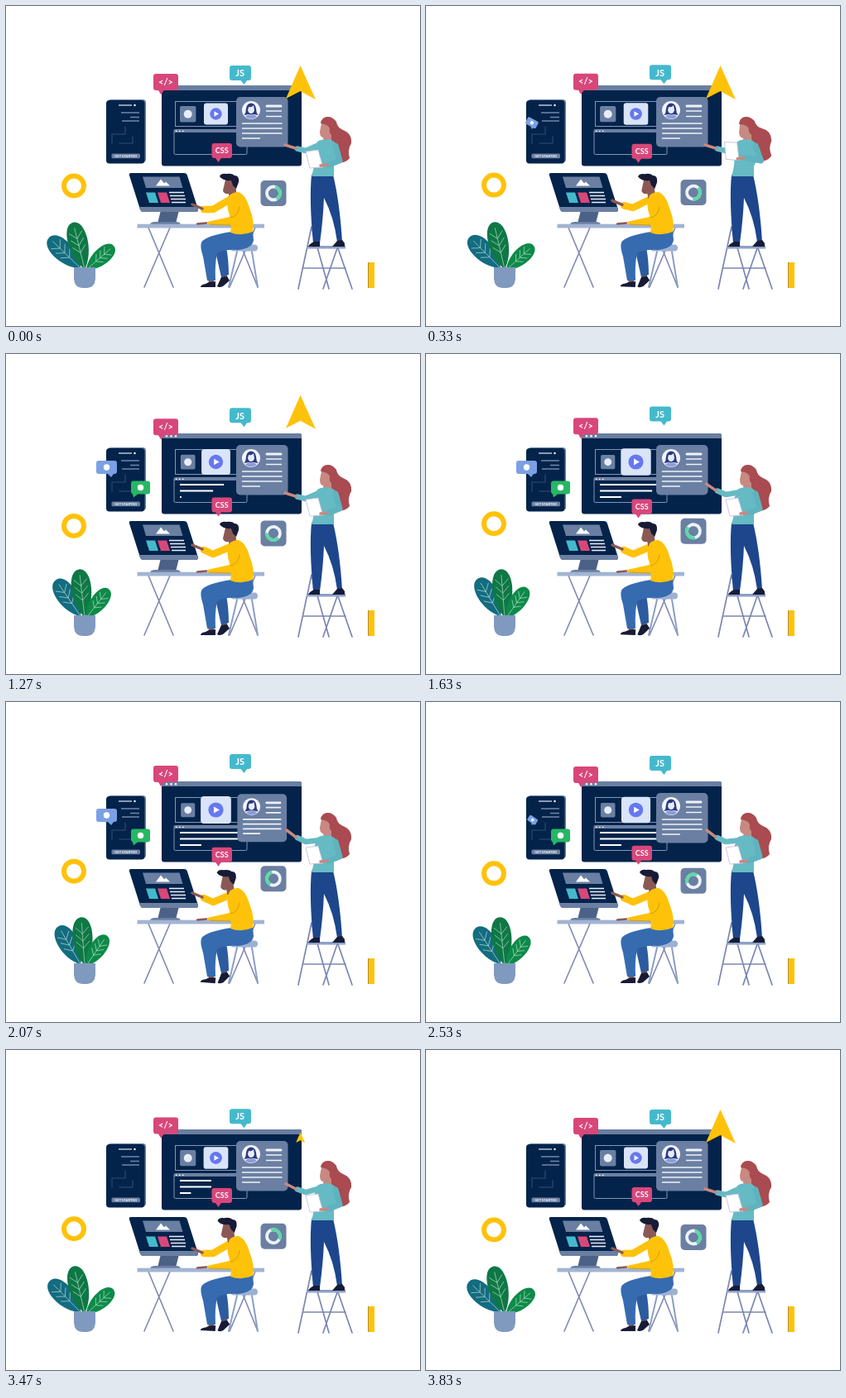
An HTML page for the animation above (3.86 s loop, 500 by 387 pixels).

```html
<!DOCTYPE html>
<html lang="en">
<head>
<meta charset="utf-8">
<title>Team building an app</title>
<style>
  html, body { margin: 0; width: 100%; height: 100%; overflow: hidden; background: #fff; }
  svg { display: block; width: 100vw; height: 100vh; }
  text { font-family: Lato, "Open Sans", sans-serif; font-weight: 700; fill: #fff; text-anchor: middle; }
  .line { fill: none; stroke-linecap: round; stroke-linejoin: round; }
  .pale { fill: none; stroke: #eef2f9; stroke-width: 1.7; }
  .bold { stroke-width: 3; stroke-linecap: round; }
</style>
</head>
<body>
<svg viewBox="0 0 500 387">
  <rect width="500" height="387" fill="#fff"/>

  <!-- browser window -->
  <rect x="188" y="96" width="169" height="97.5" rx="3" fill="#04234a"/>
  <path d="M188 102v-3q0-3 3-3h163q3 0 3 3v3z" fill="#6a7fa2"/>
  <g fill="#fff"><circle cx="194" cy="99.2" r="1.3"/><circle cx="199.5" cy="99.2" r="1.3"/><circle cx="205" cy="99.2" r="1.3"/></g>
  <rect x="204.500" y="115.500" width="87" height="30" fill="none" stroke="#8296b6"/>
  <g id="shot">
    <rect x="-9.700" y="-9.700" width="19.400" height="19.400" rx="2" fill="#6a7fa2"/>
    <circle r="5" fill="#e8eef8"/>
  </g>
  <g id="play">
    <rect x="-14.500" y="-13" width="29" height="26" rx="3" fill="#d9e4f8"/>
    <circle r="7.200" fill="#6678ef"/>
    <path d="M-2-3.200L3.500 0-2 3.200z" fill="#fff"/>
  </g>
  <rect x="203" y="149.500" width="88" height="30" rx="1.500" fill="none" stroke="#8296b6"/>
  <path d="M203 151.300h88" stroke="#6a7fa2" stroke-width="3.600"/>
  <path d="M205 151.400h1.500m2.500 0h1.500m2.500 0h1.500" stroke="#fff" stroke-width="1.200"/>
  <path id="code" stroke="#fff" stroke-width="2"/>
  <g id="card">
    <rect x="278" y="110" width="62.500" height="60.500" rx="5" fill="#6a7fa2"/>
    <circle cx="296" cy="126" r="11" fill="#f1f4fa"/>
    <path d="M287.500 132Q290 129 290 124 291 117.500 296 117.500T302 124Q302 129 304.500 132L299 131h-6z" fill="#2c3b80"/>
    <path d="M289 134q2-3 7-3t7 3q-7 5-14 0z" fill="#8d9cd6"/>
    <path d="M293 122q4 1 6-2l1 6q-1 4-4 4t-4-4z" fill="#e8eef8"/>
    <path class="pale bold" d="M315 121h17"/>
    <path class="pale" d="M314 127h19M314 133.500h19M285 142h48.500M285 148h48.500M285 154h48.500M285 160h22"/>
  </g>

  <!-- phone -->
  <rect x="123" y="113" width="46" height="76" rx="4" fill="#6a7fa2"/>
  <rect x="121" y="114" width="46.500" height="76.500" rx="4" fill="#04234a"/>
  <path d="M136 120h16" stroke="#b7c5dd" stroke-width="1.500"/><circle cx="155.500" cy="120" r="1.200" fill="#fff"/>
  <path d="M139 129h22M150 134.500h11M140 139h21" stroke="#7186aa" stroke-width="1.300"/>
  <path class="line" d="M128 166v-11h16v-9M137 166h16v-8" stroke="#233f69" stroke-width="1.600"/>
  <rect x="127.500" y="178.500" width="34.500" height="5.700" rx="1.500" fill="#6a7fa2"/>
  <text x="144.700" y="182.900" font-size="4.200">GET STARTED</text>
  <g id="blue">
    <path d="M-16-20H3q3 0 3 3v10q0 3-3 3H2L-1 0l-4-4h-11q-3 0-3-3v-10q0-3 3-3z" fill="#7ba0e4"/>
    <circle cx="-6.500" cy="-12" r="3.700" fill="#fff"/>
  </g>
  <g id="green">
    <path d="M0-20h17q3 0 3 3v10q0 3-3 3H5L0 0l-1-4q-2-1-2-3v-10q0-3 3-3z" fill="#27b764"/>
    <circle cx="8.500" cy="-12" r="3.700" fill="#fff"/>
  </g>

  <!-- speech labels -->
  <g id="tag">
    <path d="M181 82h24q3 0 3 3v14q0 3-3 3h-14l-4 5-3-5h-3q-3 0-3-3v-14q0-3 3-3z" fill="#d8477a"/>
    <text x="193" y="95.700" font-size="11">&lt;/&gt;</text>
  </g>
  <g id="js">
    <path d="M273 72h20q3 0 3 3v12q0 3-3 3h-2l-3.500 5-4-5H273q-3 0-3-3V75q0-3 3-3z" fill="#45b9cc"/>
    <text x="282.700" y="85.200" font-size="11">JS</text>
  </g>
  <g id="css">
    <path d="M251.500 167H270q3 0 3 3v12q0 3-3 3h-10l-3.500 5-3.500-5h-1.500q-3 0-3-3v-12q0-3 3-3z" fill="#d8477a"/>
    <text x="260.700" y="179.300" font-size="9">CSS</text>
  </g>

  <path id="arrow" d="M0 0L18.500 41 0 31-17.500 40z" fill="#ffc20a"/>
  <circle id="ring" cx="82" r="12" fill="none" stroke="#ffc20a" stroke-width="6"/>
  <path d="M437 310h8v31h-8z" fill="#ffc20a"/><path d="M437.500 310v31" stroke="#b18c3c"/>

  <!-- donut widget -->
  <g id="widget">
    <rect x="-15.500" y="-15.500" width="31" height="31" rx="5" fill="#6a7fa2"/>
    <g id="donut" fill="none" stroke-width="3.800">
      <circle r="8" stroke="#edf2fa"/>
      <path d="M2-7.750A8 8 0 0 1 3.400 7.240" stroke="#5bd9a4"/>
    </g>
  </g>

  <!-- plant -->
  <g id="plant"></g>
  <path d="M82 316h26v14q-1 11-10 11h-6q-9 0-10-11z" fill="#8099bf"/>

  <!-- desk, monitor, stool -->
  <path class="line" d="M172 268l30 72M198 268l-31 72M275 268l29 72M301 268l-31 72" stroke="#8187b5" stroke-width="1.600"/>
  <path d="M187 247h22l-4 16h-22z" fill="#4c6186"/>
  <path d="M174 264q1-3 6-3h25q5 0 6 3z" fill="#6a7fa2"/>
  <path d="M151 202h64q3 0 4 3l13 41q0 3-3 3h-63q-3 0-4-3l-13-41q-1-3 2-3z" fill="#04234a"/>
  <path d="M160.500 243h70.500l1 3q0 3-3 3h-63q-3 0-4-3z" fill="#6a7fa2"/>
  <path d="M165 206.500h44.500l4 13.500h-44.500z" fill="#6a7fa2"/>
  <path d="M181 217.500l6-8 4 5 2-2 5 5z" fill="#fff"/>
  <path d="M169 225.500h11l4 12.500h-11z" fill="#45b9cc"/><path d="M183 225.500h11l4 12.500h-11z" fill="#d8477a"/>
  <path class="pale" d="M197 225.500h18M198 229.500h18M199 233.500h18M200 237.500h17"/>
  <rect x="158.500" y="263.700" width="153.500" height="4.800" fill="#a2b4d3"/>
  <path class="line" d="M279 297l-10 43M297 297l7 43" stroke="#8ba0c4" stroke-width="2"/>
  <rect x="271" y="288.500" width="33" height="8" rx="4" fill="#9db0d2"/>

  <!-- man -->
  <g id="manArm" class="line"><path stroke="#ffc20a" stroke-width="8.500"/><path stroke="#8b5955" stroke-width="3.500"/></g>
  <path d="M244 329h7v7h-6zM260 325h7v6h-6z" fill="#8b5955"/>
  <path id="backShoe" d="M260 328l7-1 3 5-8 7q-5 2-7 0z" fill="#171b36"/>
  <path id="frontShoe" d="M245 334l8-1v7h-18q0-3 6-4z" fill="#171b36"/>
  <path d="M266 282Q252 285 253 297L260 328 269 325Q269 307 266 292z" fill="#2c5b9f"/>
  <path d="M272 273Q240 278 236 286 234 291 238 303L243 332H253Q252 312 255 299 264 294 280 295 298 293 299 283L298 272z" fill="#366bb0"/>
  <g id="manHead">
    <path d="M265 210h12l1 14 1 8-9 1-1-6q-6 1-7-4z" fill="#8b5955"/>
    <path d="M258 206q2-4 8-3 7-1 10 2 6 0 5 8l-3 8-4-4-2-6q-10 1-14-5z" fill="#171b36"/>
  </g>
  <path d="M270 229Q274 225 281 225 290 229 294 244 301 262 298 273 284 279 271 274 273 263 270 253 265 240 270 229z" fill="#ffc20a"/>
  <path d="M279 240Q290 245 287 256 284 265 274 265L244 264 243 261 270 255z" fill="#ffc20a"/>
  <path class="line" d="M271 256q9-1 11-13M271 265l-25-1" stroke="#d99d00"/>
  <path class="line" d="M242 262.500l-11 1" stroke="#8b5955" stroke-width="2.500"/>

  <!-- ladder -->
  <path class="line" d="M369 267l-16 75M369 267l21 75M401 293l17 49M400 293l-17 49M359 317h51" stroke="#7c86b2" stroke-width="1.700"/>
  <rect x="363" y="290" width="47" height="3.500" fill="#8ca0c5"/>

  <!-- woman -->
  <path d="M369 204h26Q403 237 406 285h-6Q396 255 384 232 383 258 379 287h-8Q366 235 369 204z" fill="#1d468c"/>
  <path d="M372 285h7v6h-14q1-3 7-6zM400 284l6-1 3 4v4h-15z" fill="#171b36"/>
  <g id="womanHead">
    <path d="M385 135Q393 132 399 140 400 147 407 150 418 154 417 166 412 174 415 184 410 190 404 189 401 178 396 172 392 164 393 154z" fill="#a94b50"/>
    <path d="M381 142q6-5 11 0l1 13v10l-9 1-1-7q-4 0-4-7z" fill="#c78981"/>
    <path d="M380 142Q381 134 389 134q9 1 10 11l-6 11q-3-3-2-8-2-5-11-6z" fill="#a94b50"/>
  </g>
  <path d="M376 164Q382 160 393 162 403 167 402 180L396 194v12h-27Q374 190 372 176z" fill="#66bac3"/>
  <g id="pointer" class="line"><path stroke="#66bac3" stroke-width="6.500"/><path stroke="#c78981" stroke-width="3.500"/></g>
  <path id="paper" d="M362 176l15-2 6 21-16 1z" fill="#fff" stroke="#bcb9df" stroke-width=".8"/>
  <g id="holder" class="line"><path stroke="#5fb3be" stroke-width="7"/><path stroke="#c78981" stroke-width="3.500"/></g>
</svg>

<script>
const LOOP = 3860;
const $ = id => document.getElementById(id);
const set = (id, transform) => $(id).setAttribute('transform', transform);
const mix = (a, b, k) => a + (b - a) * k;
const linear = (t, a, b) => Math.min(1, Math.max(0, (t - a) / (b - a)));
const ramp = (t, a, b) => { const k = linear(t, a, b); return k * k * (3 - 2 * k); };
const pulse = (t, a, b, c, d) => ramp(t, a, b) - ramp(t, c, d);

// base x, base y, length, half width, open angle, closed angle, colour
const leaves = [
  [90, 317, 53, 16, -46, -30, '#136c80'],
  [95, 318, 58, 16, -14, -4, '#0e7845'],
  [97, 319, 44, 13, 49, 34, '#0d8a48']
];

function leafShape([, , len, w, , , fill]) {
  let veins = `M0 0V${-len * .88}`;
  for (const k of [.35, .5, .65]) {
    veins += `M${-w * .5} ${-len * (k + .14)}L0 ${-len * k}L${w * .5} ${-len * (k + .14)}`;
  }
  return `<g><path d="M0 0C${-w} ${-len * .3} ${-w} ${-len} 0 ${-len}C${w} ${-len} ${w} ${-len * .3} 0 0z" fill="${fill}"/>
    <path d="${veins}" fill="none" stroke="#c5e6d8" stroke-width=".6"/></g>`;
}
$('plant').innerHTML = leaves.map(leafShape).join('');

function limb(id, sleeve, hand) {
  const [cloth, skin] = $(id).children;
  cloth.setAttribute('d', sleeve);
  skin.setAttribute('d', hand);
}

function pop(id, x, y, size) {
  set(id, `translate(${x} ${y}) rotate(${(1 - size) * 65}) scale(${size})`);
}

function draw(t) {
  const phase = t / LOOP * 2 * Math.PI;
  const sway = (1 - Math.cos(phase)) / 2;
  const nod = (1 - Math.cos(phase * 3)) / 2;

  set('js', `translate(0 ${-9 * sway})`);
  set('tag', `translate(0 ${-5 * sway})`);
  set('css', `translate(0 ${-1 + 10 * sway})`);
  $('ring').setAttribute('cy', 217.5 - 13 * sway);
  set('shot', `translate(219.700 130.700) scale(${1 - .12 * sway})`);
  set('play', `translate(253.500 130.500) scale(${1 + .27 * sway})`);
  set('widget', `translate(323 ${226.5 - 13 * sway})`);
  set('donut', `rotate(${t / LOOP * 360})`);
  leaves.forEach(([x, y, , , open, closed], i) =>
    $('plant').children[i].setAttribute('transform', `translate(${x} ${y}) rotate(${mix(open, closed, sway)})`));

  pop('blue', 128, 149, pulse(t, 150, 480, 2380, 2670));
  pop('green', 154, 173.5, pulse(t, 560, 860, 2970, 3230));

  const erase = 1 - ramp(t, 3250, 3700);
  const rows = [[158, 74, 560, 1550], [165.5, 74, 645, 1800], [173, 26, 1245, 1620]];
  $('code').setAttribute('d', rows.map(([y, w, a, b]) => `M210 ${y}h${w * linear(t, a, b) * erase}`).join(''));

  const shrink = 1 - .045 * pulse(t, 1750, 2050, 2100, 2450);
  set('card', `translate(309.500 140.500) scale(${shrink}) translate(-309.500 -140.500)`);

  const lift = 55 * linear(t, 1080, 1480) ** 1.23;
  const back = t > 2000;
  const size = back ? ramp(t, 3350, 3680) : 1;
  set('arrow', back ? `translate(355.500 ${112 - 40 * size}) scale(${size})` : `translate(355.500 ${72 - lift})`);
  $('arrow').setAttribute('opacity', back ? 1 : 1 - linear(t, 1390, 1500));

  const reach = pulse(t, 150, 500, 2750, 3200);
  const handY = mix(240, 231, reach);
  const elbowY = mix(246, 242, reach);
  limb('manArm', `M274 232L250 ${elbowY}L239 ${handY + 6}`, `M237 ${handY + 5}L225 ${handY}`);
  set('manHead', `translate(${-3 * nod} 0) rotate(${-2 * nod} 274 230)`);
  set('frontShoe', `rotate(${5 * nod} 251 336)`);
  set('backShoe', `rotate(${-4 * nod} 263 328)`);

  const look = pulse(t, 80, 450, 900, 1260);
  set('womanHead', `rotate(${-8 * look} 388 161)`);
  set('paper', `translate(${-4 * look} ${-13 * look}) rotate(${12 * look} 372 185)`);
  const wristX = mix(385, 380, look), wristY = mix(192, 181, look);
  limb('holder', `M398 169L${mix(403, 405, look)} 187L${wristX + 5} ${wristY}`, `M${wristX + 3} ${wristY}L${wristX - 5} ${wristY + 1}`);
  const point = pulse(t, 1300, 1750, 3230, 3700);
  const tipX = mix(337, 339, point), tipY = mix(168, 155, point);
  const bendY = mix(175, 169, point);
  limb('pointer', `M380 167L362 ${bendY}L352 ${mix(bendY, tipY, .35)}`, `M350 ${mix(bendY, tipY, .4)}L${tipX} ${tipY}`);
}

function tick() {
  draw(performance.now() % LOOP);
  requestAnimationFrame(tick);
}
tick();
</script>
</body>
</html>
```
